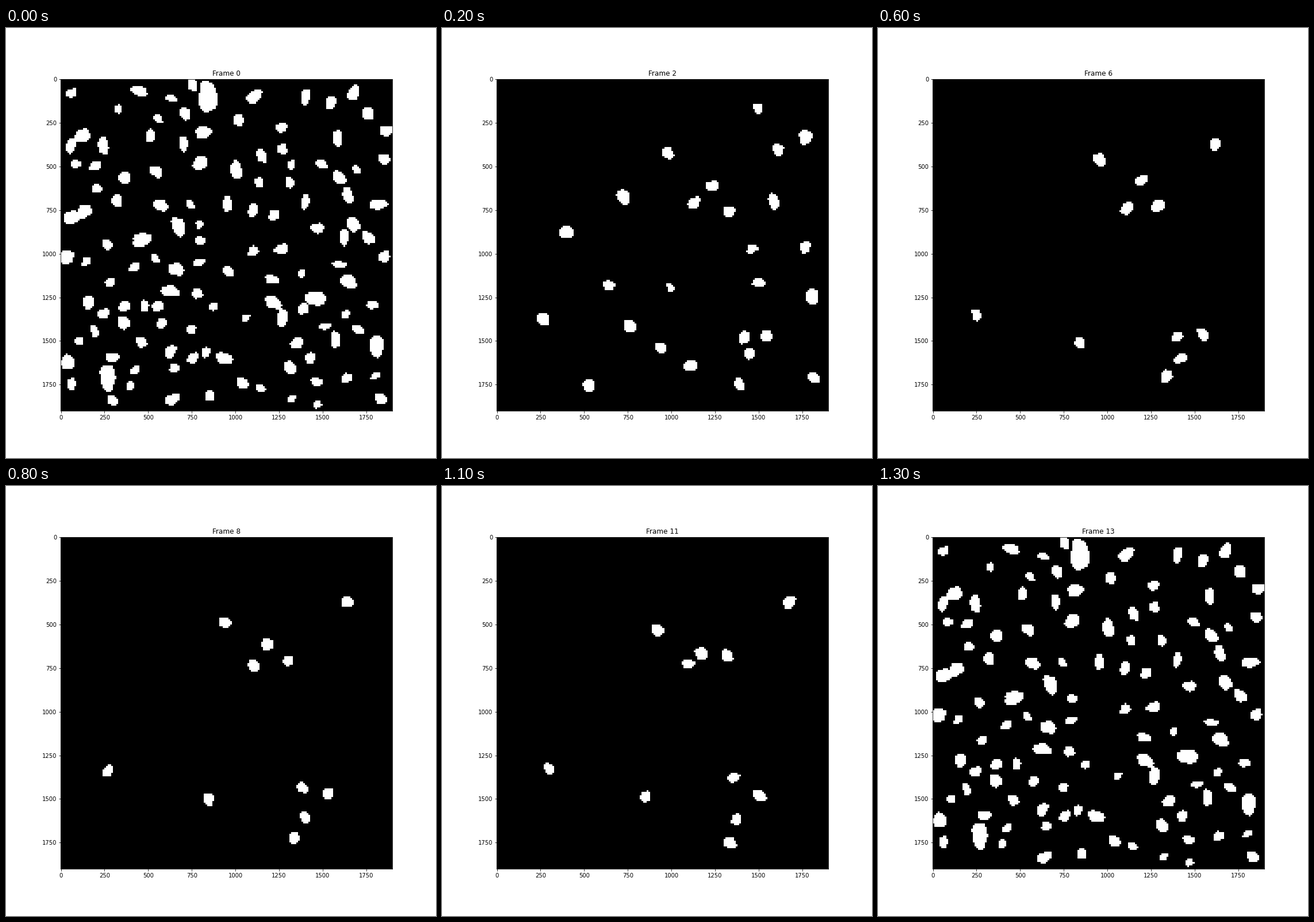
Write a matplotlib script that moves like this. It is 748 px wide and 748 px high and loops after 1.4 s.

```python
import matplotlib.pyplot as plt
import numpy as np
from matplotlib.animation import FuncAnimation

SIZE, DPI = 748, 72
GRID, BLOCK = 190, 10
FRAMES, INTERVAL = 14, 100
LAST = FRAMES - 1

# Landmark cells of the crowded picture in grid units, large to small.
TALL = [(84.4, 10), (27, 171), (181, 153), (67.5, 84.5), (100.5, 52),
        (24.5, 38), (164.5, 66.5), (158.5, 34)]
BROAD = [(146, 125.5), (46.5, 92), (7, 79), (165, 116), (12.5, 32.5),
         (80, 48), (3.5, 102), (111, 10)]

# Tracked cells pass through three points each at the key times.
KEY_TIMES = [1, 6, LAST - 1]
TRACKS = [
    [(98.7, 41.6), (95.5, 46), (91.8, 54.9)],
    [(161, 41), (161.8, 37.4), (169, 37.4)],
    [(124.5, 62), (119.5, 58), (117, 68.5)],
    [(113.5, 70), (111.3, 74), (109.5, 72.3)],
    [(134.2, 76.5), (129, 72.5), (132.6, 67)],
    [(27, 138), (25.2, 135), (31, 132)],
    [(96.5, 154.5), (84.4, 151.2), (85.6, 148)],
    [(142.4, 148), (140.3, 147.4), (135, 136)],
    [(154.5, 147.3), (154.8, 146.3), (149.8, 148.4)],
    [(145.5, 156.5), (142, 160), (136.4, 162)],
    [(140.5, 176), (134, 170.3), (133.6, 176.2)],
]

COL, ROW = np.meshgrid(np.arange(GRID) + 0.5, np.arange(GRID) + 0.5)


def add_cell(image, centre, size, rng):
    """Rasterise one slightly lumpy, tilted ellipse."""
    u = (COL - centre[0]) / (size[0] / 2)
    v = (ROW - centre[1]) / (size[1] / 2)
    u = u + rng.uniform(-0.35, 0.35) * v
    angle = np.arctan2(v, u)
    edge = 1.03
    for lobes, depth in ((2, 0.04), (3, 0.06), (5, 0.04)):
        edge = edge + depth * np.sin(lobes * angle + rng.uniform(0, 2 * np.pi))
    image[np.abs(u) ** 2.3 + np.abs(v) ** 2.3 <= edge ** 2.3] = 1


def scatter(rng, count, taken, tries, allowed=lambda x, y: True):
    """Place cells one by one, each in the widest gap among a few tries."""
    taken, cells = list(taken), []
    while len(cells) < count:
        options = [p for p in rng.uniform(3, GRID - 3, (tries, 2)) if allowed(*p)]
        if not options:
            continue
        centre = max(options, key=lambda p: np.hypot(*(np.array(taken) - p).T).min())
        taken.append(centre)
        d, stretch = rng.uniform(4.3, 8), np.exp(rng.normal(0, 0.13))
        cells.append((centre, (d / stretch, d * stretch)))
    return cells


def landmarks():
    heights = 8.5 + 8.5 * np.exp(-np.arange(len(TALL)) / 2.5)
    widths = 8 + 4 * np.exp(-np.arange(len(BROAD)) / 2)
    return ([(c, (0.62 * h, h)) for c, h in zip(TALL, heights)]
            + [(c, (w, 7.4)) for c, w in zip(BROAD, widths)])


FIELD = landmarks() + scatter(np.random.default_rng(11), 108, TALL + BROAD, 5)
LEAVING = 7

# Short-lived cells keep clear of the upper left corner.
BRIEF = scatter(np.random.default_rng(4), 31, [path[0] for path in TRACKS], 6,
                allowed=lambda x, y: x + y > 105)


def draw_field(image, cells):
    for k, (centre, size) in enumerate(cells):
        add_cell(image, centre, size, np.random.default_rng([1, k]))


def draw_brief(image, frame):
    """About half of the short-lived cells are lost with every step."""
    for k, (centre, size) in enumerate(BRIEF[:len(BRIEF) // 2 ** (frame - 1)]):
        rng = np.random.default_rng([2, k])
        drift = rng.normal(0, 1.5, 2) * (frame - 1)
        add_cell(image, centre + drift, size, rng)


def draw_specks(image):
    rng = np.random.default_rng(8)
    for x, y in rng.normal((153, 101), (9, 4), (16, 2)).astype(int):
        image[y:y + rng.integers(1, 4), x] = 1


def draw_tracks(image, frame):
    for k, path in enumerate(TRACKS):
        centre = [np.interp(frame, KEY_TIMES, axis) for axis in zip(*path)]
        rng = np.random.default_rng([3, k, frame])
        add_cell(image, centre, rng.uniform(5.3, 7.3, 2), rng)


def picture(frame):
    image = np.zeros((GRID, GRID))
    if frame == 0:
        draw_field(image, FIELD)
    elif frame == LAST:
        draw_field(image, FIELD[:-LEAVING])
    else:
        draw_tracks(image, frame)
        if frame <= 3:
            draw_brief(image, frame)
        if frame == 1:
            draw_specks(image)
    return np.kron(image, np.ones((BLOCK, BLOCK)))


plt.rcParams["font.family"] = "DejaVu Sans"
fig, ax = plt.subplots(figsize=(SIZE / DPI, SIZE / DPI), dpi=DPI)
# Margins of a 10.4 inch page whose last fraction of a pixel is cut off.
page = 10.4 * DPI / SIZE
fig.subplots_adjust(left=0.125 * page, right=0.9 * page,
                    bottom=0.11 * page, top=0.88 * page)
view = ax.imshow(picture(0), cmap="gray", vmin=0, vmax=1, interpolation="nearest")
ax.set_xticks(range(0, GRID * BLOCK, 250))
ax.set_yticks(range(0, GRID * BLOCK, 250))
title = ax.set_title("Frame 0")


def update(frame):
    view.set_data(picture(frame))
    title.set_text(f"Frame {frame}")
    return view, title


anim = FuncAnimation(fig, update, frames=FRAMES, interval=INTERVAL,
                     repeat=True, repeat_delay=0, blit=False)
plt.show()
```
